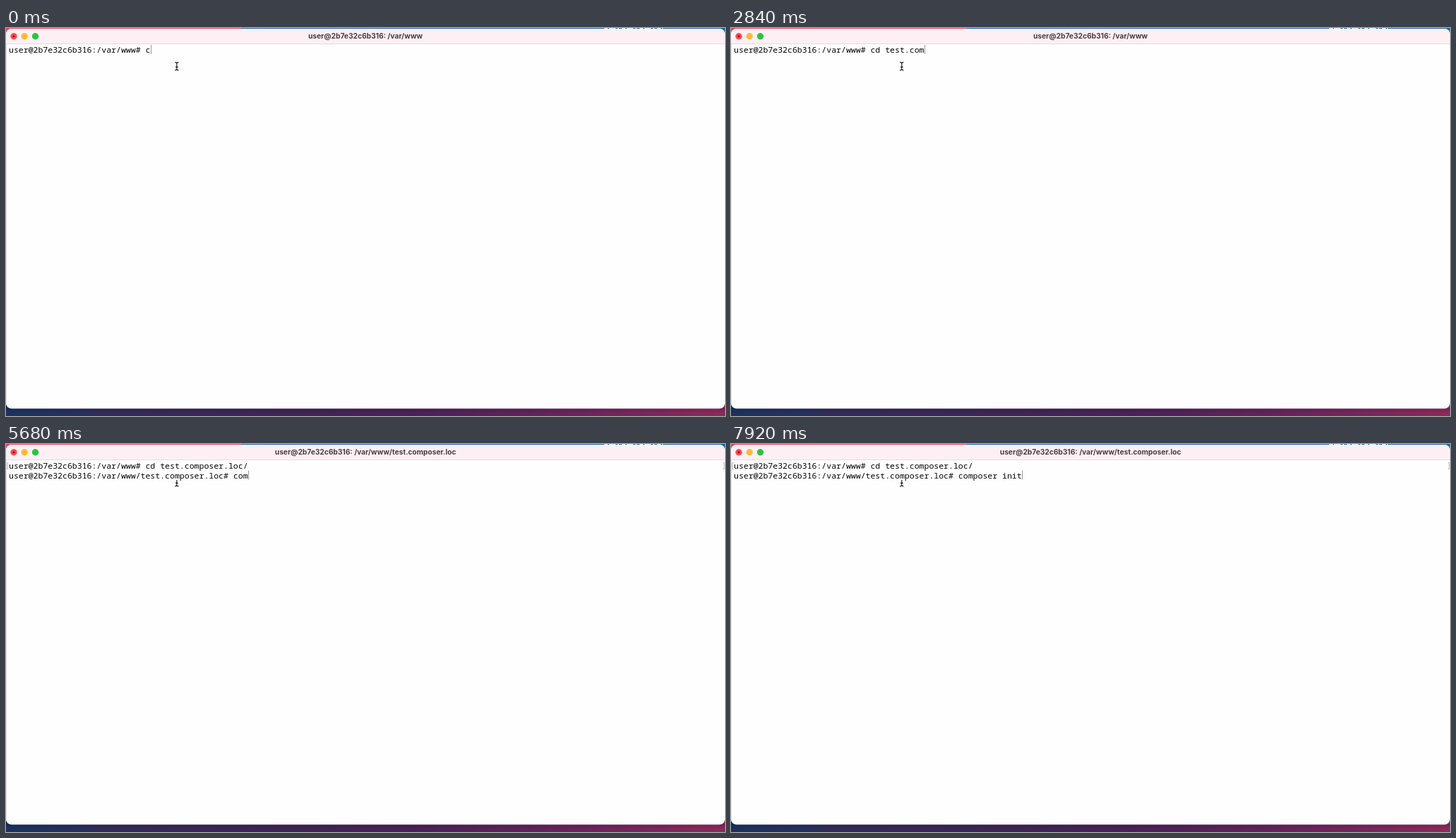
An HTML page for the animation above (8 s loop, 1018 by 550 pixels).

```html
<!DOCTYPE html>
<html lang="en">
<head>
<meta charset="utf-8">
<title>Terminal</title>
<style>
  html, body { margin: 0; width: 100%; height: 100%; overflow: hidden; background: #fff; }
  svg { display: block; width: 1018px; height: 550px; }
  text { white-space: pre; }
  .bar { font: 700 10.2px Inter, "Open Sans", sans-serif; fill: #483f43; text-anchor: middle; }
  .line { font: 500 11.53px "Noto Sans Mono", "DejaVu Sans Mono", monospace; fill: #050505; font-variant-ligatures: none; }
</style>
</head>
<body>
<svg viewBox="0 0 1018 550">
  <defs>
    <linearGradient id="desk">
      <stop offset="0" stop-color="#1b325f"/>
      <stop offset=".11" stop-color="#263060"/>
      <stop offset=".13" stop-color="#322a5b"/>
      <stop offset=".4" stop-color="#3f2458"/>
      <stop offset=".56" stop-color="#4a2059"/>
      <stop offset=".75" stop-color="#64225c"/>
      <stop offset="1" stop-color="#8c295b"/>
    </linearGradient>
    <linearGradient id="shade" x2="0" y2="1">
      <stop offset="0" stop-color="#000" stop-opacity=".18"/>
      <stop offset="1" stop-color="#000" stop-opacity="0"/>
    </linearGradient>
    <clipPath id="win"><rect y="1" width="1018" height="538.5" rx="8"/></clipPath>
  </defs>

  <!-- desktop -->
  <rect width="333" height="20" fill="#e2495b"/>
  <rect x="333" width="685" height="20" fill="#1f6aa3"/>
  <path d="M847 .5H930" stroke="#e4ebf2" stroke-dasharray="5 2 9 3 2 4"/>
  <rect y="520" width="1018" height="30" fill="url(#desk)"/>
  <rect y="538" width="1018" height="8" fill="url(#shade)"/>

  <!-- window -->
  <g clip-path="url(#win)">
    <rect width="1018" height="550" fill="#fefefe"/>
    <rect width="1018" height="22" fill="#fcf0f4"/>
    <rect y="22" width="1018" height="1" fill="#e5dcdf"/>
    <rect y="23" width=".6" height="517" fill="#d4d4d6"/>
  </g>
  <circle cx="11" cy="11.7" r="4.7" fill="#fe4b4b"/>
  <circle cx="11" cy="11.7" r="1.5" fill="#78060b"/>
  <circle cx="26.2" cy="11.7" r="4.7" fill="#febb2c"/>
  <circle cx="41.5" cy="11.7" r="4.7" fill="#27c63f"/>
  <text id="title" class="bar" x="509" y="15.2"></text>

  <!-- pointer -->
  <path d="M239.2 48.6Q241.8 48.6 241.8 50.2Q241.8 48.6 244.4 48.6M241.8 50V58.5M239.2 59.9Q241.8 59.9 241.8 58.3Q241.8 59.9 244.4 59.9M240 55.4H243.6"
        fill="none" stroke="#111" stroke-width="1.1"/>

  <rect id="row" x="236" y="37" width="12" height="14" fill="#fefefe"/>
  <path id="marks" d="M3.4 26.5H1.8V35.5H3.4M1015.3 26.5H1016.9V35.5H1015.3" fill="none" stroke="#a9a9a9" stroke-width=".9"/>
  <text id="first" class="line" x="4" y="34.8"></text>
  <text id="second" class="line" x="4" y="48.6"></text>
  <rect id="caret" width="1" height="13" fill="#999"/>
</svg>
<script>
  const LOOP = 8000, ADVANCE = 6.918, ENTER = 4480, MARKED = 3280;
  const host = "user@2b7e32c6b316:";
  const home = "/var/www", project = home + "/test.composer.loc";
  const cd = "cd test.composer.loc/", init = "composer init";

  // [time in ms, typed characters]
  const cdKeys = [[0, 1], [150, 2], [900, 3], [1500, 4], [1650, 6], [1800, 7],
    [2400, 8], [2540, 9], [2690, 10], [2840, 11], [MARKED, cd.length]];
  const initKeys = [[ENTER, 0], [5230, 1], [5380, 2], [5680, 3], [5830, 4], [5980, 5],
    [6130, 6], [6280, 8], [6580, 9], [7170, 10], [7320, 11], [7770, 12], [7920, 13]];

  const $ = id => document.getElementById(id);
  const typed = (text, keys, t) =>
    text.slice(0, keys.reduce((n, [at, count]) => t >= at ? count : n, 0));
  const setText = (id, value) => {
    if ($(id).textContent !== value) $(id).textContent = value;
  };
  const show = (id, on) => $(id).setAttribute("visibility", on ? "visible" : "hidden");

  function draw(t) {
    const entered = t >= ENTER;
    const first = `${host}${home}# ${typed(cd, cdKeys, t)}`;
    const second = entered ? `${host}${project}# ${typed(init, initKeys, t)}` : "";
    setText("title", `${host} ${entered ? project : home}`);
    setText("first", first);
    setText("second", second);
    show("marks", t >= MARKED);
    show("row", entered);
    $("caret").setAttribute("x", Math.round(4 + (second || first).length * ADVANCE));
    $("caret").setAttribute("y", entered ? 37.5 : 24);
  }

  const start = performance.now();
  function tick() {
    draw((performance.now() - start) % LOOP);
    requestAnimationFrame(tick);
  }
  tick();
</script>
</body>
</html>
```
